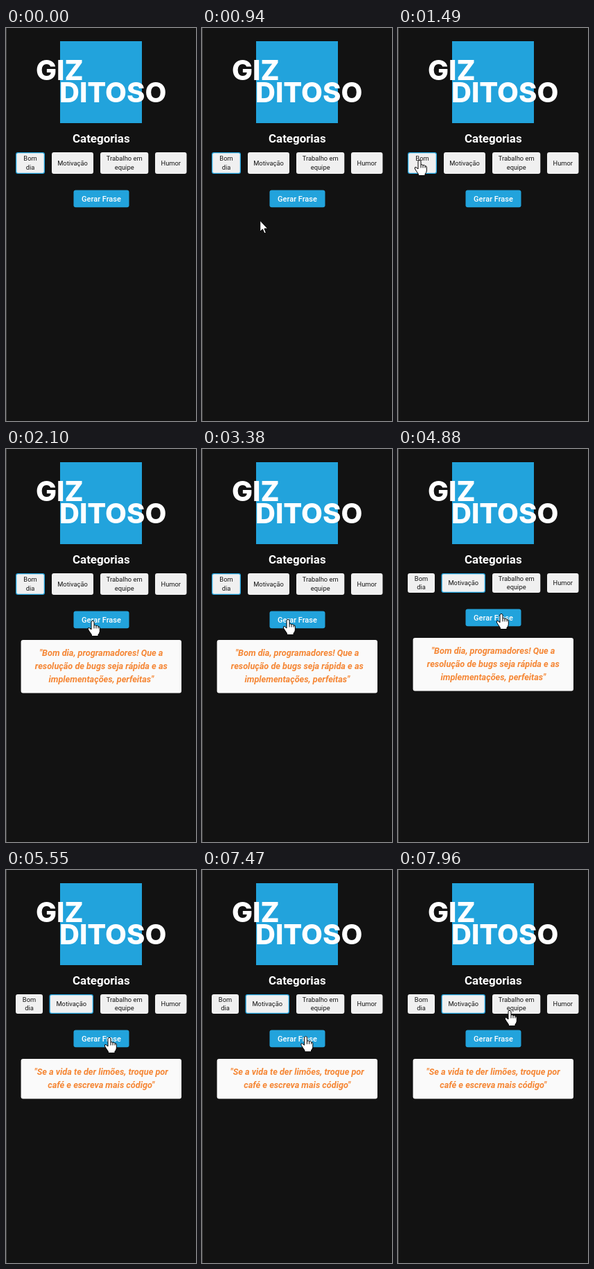
An HTML page with a canvas for the animation above (8000 ms loop, 274x566 px).

```html
<!DOCTYPE html>
<html lang="pt-BR">
<head>
<meta charset="utf-8">
<title>Frases</title>
<style>
html, body { margin: 0; width: 100%; height: 100%; overflow: hidden; background: #121212; }
canvas { display: block; width: 274px; height: 566px; }
</style>
</head>
<body>
<canvas></canvas>
<script>
const LOOP = 8000, STEP = 68, W = 274, H = 566;
const BLUE = '#22a3dc', PALE = '#f0f0f0', INK = '#161616';
const canvas = document.querySelector('canvas');
const ctx = canvas.getContext('2d');
const ratio = window.devicePixelRatio || 1;
canvas.width = W * ratio;
canvas.height = H * ratio;
ctx.scale(ratio, ratio);

const hand = new Path2D('M-2 1.5Q0 -1 2 1.5V7Q4 5.8 5 7.8Q7 6.6 8 8.6Q10.3 8.2 10.3 11V16Q9.6 19 8 20.2V22.5H-1.5V20.5Q-4 17 -6.5 13Q-7.5 9.8 -5 10.5L-2 13Z');
const knuckles = new Path2D('M2 7V11.5M5 8V11.5M8 9V11.5');
const arrow = new Path2D('M0 0V16L3.7 12.6L6.2 18.5L8.6 17.4L6.2 11.7H11Z');

const easeOut = p => 1 - (1 - p) ** 2;
const easeInOut = p => p * p * (3 - 2 * p);

// Pointer moves: start, duration, from, to, easing
const moves = [
  { start: 590, time: 680, from: [242, 539], to: [31, 190], ease: easeOut },
  { start: 1490, time: 272, from: [31, 190], to: [125, 247], ease: easeInOut },
  { start: 3312, time: 612, from: [125, 247], to: [98, 191], ease: easeInOut },
  { start: 4392, time: 476, from: [98, 191], to: [149, 237], ease: easeInOut },
  { start: 5014, time: 136, from: [149, 237], to: [149, 241], ease: easeInOut },
  { start: 7402, time: 544, from: [149, 241], to: [161, 202], ease: easeInOut }
];
const clicks = [[1355, 1490], [1960, 2100], [4055, 4190], [5420, 5550]];

const greeting = ['"Bom dia, programadores! Que a', 'resolução de bugs seja rápida e as', 'implementações, perfeitas"'];
const lemons = ['"Se a vida te der limões, troque por', 'café e escreva mais código"'];

function box(x, y, w, h, fill, radius = 3) {
  ctx.beginPath();
  ctx.roundRect(x, y, w, h, radius);
  ctx.fillStyle = fill;
  ctx.fill();
}

function text(str, x, y, font, fill, align = 'center') {
  ctx.font = font;
  ctx.fillStyle = fill;
  ctx.textAlign = align;
  ctx.fillText(str, x, y);
}

function category({ x, w, lines }, h, selected) {
  box(x, 179, w, h, selected ? BLUE : PALE);
  if (selected) box(x + 1.3, 180.3, w - 2.6, h - 2.6, PALE, 2);
  const first = 179 + h / 2 + 3 - (lines.length - 1) * 6.2;
  lines.forEach((line, i) =>
    text(line, x + w / 2, first + i * 12.4, '9.35px Roboto, sans-serif', INK));
}

function phrase(lines, y) {
  box(21.6, y, 231.4, 19.4 + lines.length * 19, '#fafafa');
  lines.forEach((line, i) =>
    text(line, 137.3, y + 23 + i * 19, 'italic 700 12.7px Roboto, sans-serif', '#f58634'));
}

function pointerAt(t) {
  const move = moves.findLast(m => t >= m.start);
  if (!move) return null;
  const elapsed = Math.floor((t - move.start) / STEP) * STEP;
  const p = move.ease(Math.min(1, elapsed / move.time));
  return move.from.map((a, i) => a + (move.to[i] - a) * p);
}

function pointer(t, buttons) {
  const at = pointerAt(t);
  if (!at) return;
  const [x, y] = at;
  if (clicks.some(([a, b]) => t >= a && t < b)) {
    ctx.beginPath();
    ctx.arc(x, y + 0.5, 12.5, 0, Math.PI * 2);
    ctx.fillStyle = 'rgba(247, 238, 72, 0.72)';
    ctx.fill();
  }
  const over = buttons.some(([bx, by, w, h]) => x >= bx && x <= bx + w && y >= by && y <= by + h);
  const shape = over ? hand : arrow;
  ctx.save();
  ctx.translate(x, y);
  ctx.fillStyle = '#fff';
  ctx.strokeStyle = '#000';
  ctx.lineWidth = 1;
  ctx.lineJoin = 'round';
  ctx.fill(shape);
  ctx.stroke(shape);
  if (over) ctx.stroke(knuckles);
  ctx.restore();
}

function draw(t) {
  ctx.fillStyle = '#121212';
  ctx.fillRect(0, 0, W, H);
  ctx.fillStyle = '#444';
  ctx.fillRect(0, 0, 1, H);

  ctx.fillStyle = BLUE;
  ctx.fillRect(78, 19, 118, 118);
  const titleFont = '800 40px Inter, sans-serif';
  text('GIZ', 43, 75, titleFont, '#fff', 'left');
  text('DITOSO', 77, 107, titleFont, '#fff', 'left');
  text('Categorias', 137.3, 165, '700 16.9px Roboto, sans-serif', '#fff');

  const second = t >= 4190;
  const h = second ? 28 : 31;
  const shift = second ? -3 : 0;
  const categories = [
    { x: 14, w: second ? 39 : 42, lines: ['Bom', 'dia'] },
    { x: second ? 62.5 : 66, w: second ? 63.5 : 60, lines: ['Motivação'] },
    { x: 136, w: 69.3, lines: ['Trabalho em', 'equipe'] },
    { x: 215, w: 45.5, lines: ['Humor'] }
  ];
  categories.forEach((c, i) => category(c, h, i === (second ? 1 : 0)));

  box(97.5, 233.5 + shift, 80, 24.8, BLUE);
  text('Gerar Frase', 137.5, 250 + shift, '500 11px Roboto, sans-serif', '#fff');

  if (t >= 2030) phrase(t >= 5550 ? lemons : greeting, 275 + shift);

  pointer(t, [...categories.map(c => [c.x, 179, c.w, h]), [97.5, 233.5 + shift, 80, 25]]);
}

function frame() {
  draw(performance.now() % LOOP);
  requestAnimationFrame(frame);
}
frame();
</script>
</body>
</html>
```
